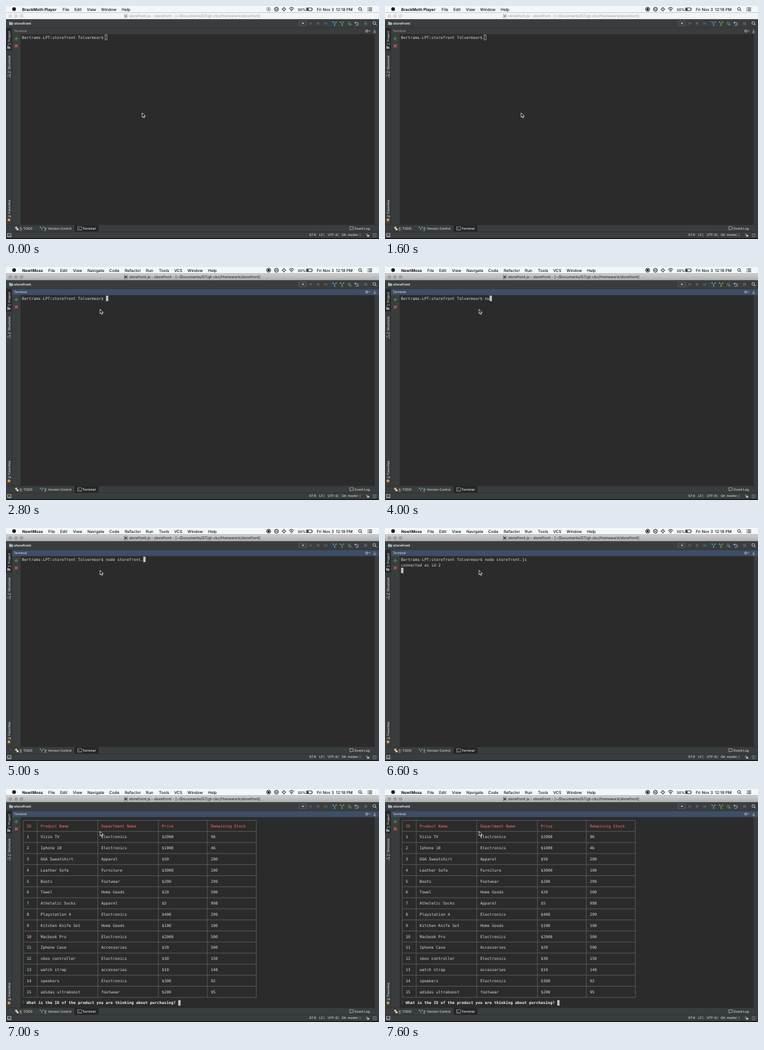
Write an HTML page that moves like this. It is 600 by 375 pixels and loops after 8000 ms.

```html
<!DOCTYPE html>
<html lang="en">
<head>
<meta charset="utf-8">
<title>Storefront terminal</title>
<style>
html, body { margin: 0; width: 100%; height: 100%; overflow: hidden; background: #3a3d3e; }
svg { display: block; width: 600px; height: 375px; }
text { font-family: Inter, sans-serif; text-rendering: geometricPrecision; white-space: pre; }
.menu { font-size: 6.4px; font-weight: 500; fill: #111; }
.ui { font-size: 5.1px; font-weight: 500; fill: #d6d8d9; }
.term { font: 6.23px "DejaVu Sans Mono", monospace; fill: #dadada; }
.bold { font-weight: 700; }
.head { fill: #ff6b68; }
.prompt { fill: #f0f0f0; }
.mark { fill: #6aa53f; }
.grid { fill: none; stroke: #626465; stroke-width: .8; }
</style>
</head>
<body>
<svg id="stage" viewBox="0 0 600 375" xmlns="http://www.w3.org/2000/svg"></svg>
<script>
const LOOP = 8000, LEFT = 25.8, TOP = 50.5, CW = 3.75, LH = 8.9;
const PROMPT = 'Bertrams-LPT:storefront Tolvermoor$ ';
const COMMAND = 'node storefront.js';
const CHROME = '#3a3d3e';

const col = c => LEFT + c * CW;
const row = r => TOP + r * LH;
const text = (x, y, s, cls, extra = '') => `<text x="${x}" y="${y}" class="${cls}" ${extra}>${s}</text>`;
const rect = (x, y, w, h, fill, extra = '') => `<rect x="${x}" y="${y}" width="${w}" height="${h}" fill="${fill}" ${extra}/>`;
const dot = (x, y, r, fill, extra = '') => `<circle cx="${x}" cy="${y}" r="${r}" fill="${fill}" ${extra}/>`;
const path = (d, stroke, w = .9, fill = 'none') => `<path d="${d}" stroke="${stroke}" stroke-width="${w}" fill="${fill}"/>`;
const group = (id, body) => `<g id="${id}">${body}</g>`;
const under = s => `<tspan text-decoration="underline">${s}</tspan>`;
const term = (c, r, s, cls = '') => text(col(c), row(r) + 2.2, s, 'term ' + cls);
const side = (y, s) => text(0, 0, s, 'ui', `transform="translate(6.5 ${y}) rotate(-90)"`);

// Menu bar
const menu = (app, items) => text(26, 7.6, app, 'menu bold') + items.map(([x, s]) => text(x, 7.6, s, 'menu')).join('');
const playerMenu = menu('BrackMoth Player', [[91, 'File'], [110, 'Edit'], [130, 'View'], [153, 'Window'], [186, 'Help']]);
const editorMenu = menu('NewtMoss', [[68, 'File'], [87, 'Edit'], [107.5, 'View'], [131, 'Navigate'], [166, 'Code'],
  [191, 'Refactor'], [225, 'Run'], [246, 'Tools'], [270.5, 'VCS'], [292, 'Window'], [325, 'Help']]);

const menuBar = rect(0, 0, 600, 10.6, '#f2f7fa') + dot(13, 5, 3, '#1c1c1c')
  + group('player', playerMenu) + group('editor', editorMenu)
  + group('record', dot(422.5, 5.2, 3.2, 'none', 'stroke="#111" stroke-width="1"') + rect(420.9, 3.6, 3.2, 3.2, '#111'))
  + dot(435, 5.2, 3.1, 'none', 'stroke="#111" stroke-width="1"') + path('M433.2 5.2h3.6', '#111', 1)
  + path('M447 1.6v7.2M443.4 5.2h7.2', '#111', .8) + dot(447, 5.2, 2.1, '#f2f7fa', 'stroke="#111" stroke-width=".9"')
  + path('M455.3 4.2q4-3.8 8 0M456.7 5.8q2.6-2.4 5.2 0M458.1 7.2q1.2-1 2.4 0', '#111', 1) + dot(459.3, 8, .6, '#111')
  + text(469, 7.6, '30%', 'menu', 'style="font-size:5.8px"')
  + path('M483.4 3h8.6v4.6h-8.6zM493 4.4v1.8', '#111', .8) + rect(484.2, 3.8, 2.4, 3, '#111')
  + text(500, 7.6, 'Fri Nov 3\u00a0 12:18 PM', 'menu')
  + dot(569.4, 4.7, 2.2, 'none', 'stroke="#111" stroke-width=".9"') + path('M571 6.3l2 2', '#111', 1)
  + path('M581.5 3h1M581.5 5.3h1M581.5 7.6h1M583.3 3h5.6M583.3 5.3h5.6M583.3 7.6h5.6', '#111', .9);

// Window title, in both focus states
const title = (bg, light, ink, sheet, mark) => rect(0, 10.6, 600, 10.8, bg)
  + [7, 16, 25].map(x => dot(x, 16, 2.6, light, 'stroke="#0003" stroke-width=".4"')).join('')
  + rect(190.5, 13.2, 4.6, 5.8, sheet, `stroke="${mark}" stroke-width=".5"`) + rect(191.2, 14.8, 3.2, 2.8, mark)
  + text(198, 18.3, 'storefront.js - storefront - [~/Documents/GT/gt-cbc/Homework/storefront]', '', `style="font-size:6px" fill="${ink}"`);

const toolBar = rect(0, 21.4, 600, 13.8, CHROME) + path('M0 35.2H600', '#2b2d2e', .6)
  + path('M5 25.6h2.4l.8 1h3.2v4H5z', 'none', 0, '#9db4c3')
  + text(13, 29.8, 'storefront', 'bold', 'style="font-size:5.6px" fill="#dcdedf"')
  + rect(471.3, 24, 12.4, 7.8, '#404345', 'rx="1.2" stroke="#66696b" stroke-width=".6"')
  + path('M475.8 27.1h3.8l-1.9 2.2z', 'none', 0, '#d0d2d3')
  + path('M488.4 25v6l5-3z', 'none', 0, '#55585a') + dot(502, 28, 2.4, '#55585a') + rect(511.5, 26, 5.5, 4, '#4e5153')
  + path('M526 26l2.6 2.2v2.8M531.2 26l-2.6 2.2', '#4fa7d8', 1) + dot(526, 25.8, 1, '#4fa7d8') + dot(531.2, 25.8, 1, '#62b543') + dot(528.6, 31, 1, '#4fa7d8')
  + path('M538 26l2.6 2.2v2.8M543.2 26l-2.6 2.2', '#62b543', 1) + dot(538, 25.8, 1, '#4fa7d8') + dot(543.2, 25.8, 1, '#62b543') + dot(540.6, 31, 1, '#62b543')
  + rect(549.5, 25.2, 5, 5, '#55585a') + dot(554, 30, 1.7, '#6c7072')
  + path('M562.6 31h2.2a2.1 2.1 0 0 0 0-4.2h-3.6M562.8 25l-2 1.8 2 1.8', '#9cc3e6', 1)
  + path('M521.5 24v8M571.5 24v8', '#4c4f51', .5)
  + rect(575.8, 25.4, 5.2, 5.2, '#55585a') + dot(592.4, 27.3, 2.2, 'none', 'stroke="#d0d2d3" stroke-width=".9"')
  + path('M594 29l2.2 2.2', '#d0d2d3', 1);

const sideBars = rect(0, 35.5, 9.3, 36, '#262829') + path('M9.5 35.2V352', '#2b2d2e', .6)
  + side(62.5, under('1') + ': Project') + rect(2.4, 64.4, 2, 4.4, '#b4bfc6') + rect(5, 65.6, 1.8, 3.2, '#b4bfc6')
  + side(108, under('7') + ': Structure') + dot(3.2, 112, 1.1, '#5aa0c8') + dot(6.4, 110.7, 1, '#d0d2d3') + dot(6.4, 114, 1, '#d08460')
  + side(340, under('2') + ': Favorites')
  + path('M4.8 341l.9 2 2.2.2-1.7 1.5.6 2.2-2-1.2-2 1.2.6-2.2-1.7-1.5 2.2-.2z', 'none', 0, '#f0a83d')
  + path('M13.5 52.5h6M16.5 49.5v6', '#3f8f47', 1.4) + path('M14.2 61.9l4.6 4.6M18.8 61.9l-4.6 4.6', '#dc5a4e', 1.4);

const panelTitle = fill => rect(9.8, 35.5, 590.2, 9.8, fill);
const panel = group('calm', panelTitle(CHROME) + text(12.5, 42.2, 'Terminal', 'ui', 'opacity=".6"'))
  + group('active', panelTitle('#3e4e66') + text(12.5, 42.2, 'Terminal', 'ui'))
  + dot(580.4, 40.3, 1.7, 'none', 'stroke="#c3c5c6" stroke-width="1.3" stroke-dasharray="1 .4"')
  + path('M583.8 39.6h2.4l-1.2 1.4z', 'none', 0, '#c3c5c6')
  + path('M593 37.6v4M591.4 40.3l1.6 1.6 1.6-1.6M590.8 42.9h4.4', '#c3c5c6', .7)
  + rect(23.5, 45.3, 569.5, 306.7, '#2b2b2b');

// Tool window buttons and status bar
const arrows = x => path(`M${x} 367.7l.9-1.2.9 1.2M${x} 369.3l.9 1.2.9-1.2`, '#c3c5c6', .6);
const footer = path('M0 352.2H600M0 363.5H600', '#2b2d2e', .6)
  + rect(110, 352.4, 39, 11, '#252728')
  + dot(16.5, 356.8, 1.9, '#e0bd74') + dot(18.6, 359.4, 1.7, '#dcdedf')
  + text(22, 360, under('6') + ': TODO', 'ui')
  + path('M55.2 356l2.4 2.2v2.6M59.8 356l-2.2 2.2', '#5aaedc', 1) + dot(55.2, 356, .9, '#5aaedc') + dot(59.8, 356, .9, '#62b543')
  + text(61.5, 360, under('9') + ': Version Control', 'ui')
  + rect(115.5, 355.2, 5.8, 5.6, '#151617', 'stroke="#c9cbcc" stroke-width=".6"') + path('M116.7 357l1.2 1-1.2 1M118.4 359.4h1.7', '#eee', .6)
  + text(123, 360, 'Terminal', 'ui', 'style="fill:#f2f3f4"')
  + path('M553 355.2h5.6v4.3h-3.4l-1.3 1.4v-1.4h-.9z', '#c3c5c6', .7) + text(561, 360, 'Event Log', 'ui')
  + rect(2.6, 366.2, 5.4, 5.2, 'none', 'stroke="#c3c5c6" stroke-width=".8"') + path('M3 370h4.6', '#c3c5c6', .7)
  + text(488, 370.4, '67:8', 'ui') + text(504, 370.4, 'LF', 'ui') + arrows(510.6)
  + text(517.5, 370.4, 'UTF-8', 'ui') + arrows(533.6) + text(540, 370.4, 'Git: master', 'ui') + arrows(568.6)
  + rect(580.8, 368.4, 3.4, 2.8, '#c3c5c6') + path('M579.4 368.6v-1a1 1 0 0 1 2 0v1', '#c3c5c6', .6)
  + rect(590.8, 366.4, 4.4, 5, 'none', 'stroke="#85888a" stroke-width=".7"') + path('M591.8 368.2h2.4M591.8 369.8h2.4', '#85888a', .6)
  + rect(0, 373.8, 600, 1.2, '#0c0c0c');

// Product table
const HEAD = ['ID', 'Product Name', 'Department Name', 'Price', 'Remaining Stock'];
const ITEMS = `Vizio TV|Electronics|2000|96
Iphone 10|Electronics|1000|46
UGA Sweatshirt|Apparel|50|200
Leather Sofa|Furniture|3000|100
Boots|Footwear|200|299
Towel|Home Goods|20|500
Atheletic Socks|Apparel|5|998
Playstation 4|Electronics|400|299
Kitchen Knife Set|Home Goods|100|100
Macbook Pro|Electronics|2000|500
Iphone Case|Accessories|20|500
xbox controller|Electronics|30|150
watch strap|accessories|10|148
speakers|Electronics|300|92
adidas ultraboost|footwear|200|95`.split('\n').map((line, i) => {
  const [name, dept, price, stock] = line.split('|');
  return [i + 1, name, dept, '$' + price, stock];
});
const EDGES = [.5, 6.5, 32.5, 58.5, 79.5, 100.5];

// A cut table stops part way through its last border
function table(top, count, cut) {
  const last = top + 2 * (count + 1);
  let d = '';
  for (let r = top; r <= last; r += 2)
    d += `M${col(.5)} ${row(r)}H${cut && r === last ? 232 : col(100.5)}`;
  EDGES.forEach((e, i) => {
    const end = cut ? row(last) + (i < 3 ? 4 : -4.4) : row(last);
    d += `M${col(e)} ${row(top)}V${end}`;
  });
  const cells = [HEAD, ...ITEMS.slice(0, count)].map((cols, i) =>
    cols.map((s, c) => term(EDGES[c] + 1.5, top + 1 + 2 * i, s, i ? '' : 'head')).join('')).join('');
  return `<path class="grid" d="${d}"/>` + cells;
}

const terminal = group('shell', term(0, 0, PROMPT + '<tspan id="typed"></tspan>'))
  + group('connected', term(0, 1, 'connected as id 2'))
  + group('partial', table(2, 9, true))
  + group('full', table(0, 15, false) + term(0, 33, '?', 'mark')
    + term(2, 33, 'What is the ID of the product you are thinking about purchasing?', 'bold prompt'))
  + rect(159.4, 46.4, 3, 8.1, 'none', 'id="hollow" stroke="#c4c4c4" stroke-width=".7"')
  + rect(0, -4.4, 3.75, 8.8, '#c4c4c4', 'id="caret"');

const pointer = group('mouse', path('M0 0v7l1.6-1.5 1.1 2.6 1.3-.5-1.1-2.5h2.3z', '#fff', .8, '#000'));

document.getElementById('stage').innerHTML = rect(0, 0, 600, 375, CHROME)
  + '<linearGradient id="bar" x2="0" y2="1"><stop stop-color="#cfcfcf"/><stop offset="1" stop-color="#adadad"/></linearGradient>'
  + menuBar
  + group('idleTitle', title('#f4f4f4', '#dedede', '#9a9a9a', '#fff', '#8c8c8c'))
  + group('liveTitle', title('url(#bar)', '#a0a0a0', '#161616', '#eee', '#222'))
  + toolBar + sideBars + panel + footer + terminal + pointer;

// Each step changes only the listed values
const STEPS = [
  [0, { record: .4, mouse: [219, 172], focus: false, typed: 0, caret: null, screen: 'shell' }],
  [200, { record: 1 }],
  [1800, { mouse: [44, 73.5] }],
  [2600, { mouse: [151.3, 68.2] }],
  [2800, { focus: true, caret: [36, 0] }],
  [3800, { caret: null }],
  [4000, { typed: 2, caret: [38, 0] }],
  [4200, { typed: 4, caret: [40, 0] }],
  [4400, { typed: 6, caret: [42, 0] }],
  [5000, { typed: 16, caret: [52, 0] }],
  [5400, { typed: 17, caret: [53, 0] }],
  [5600, { typed: 18, caret: [54, 0] }],
  [6000, { caret: null }],
  [6400, { caret: [0, 1] }],
  [6600, { screen: 'connected', caret: [0, 2] }],
  [6800, { screen: 'partial', caret: [101, 22] }],
  [7000, { screen: 'full', caret: [67, 33] }]
];

const $ = id => document.getElementById(id);
const show = (id, on) => { $(id).style.display = on ? '' : 'none'; };
const move = (id, x, y) => $(id).setAttribute('transform', `translate(${x} ${y})`);
let drawn = -1;

function draw(t) {
  const n = STEPS.filter(s => s[0] <= t).length;
  if (n === drawn) return;
  drawn = n;
  const s = Object.assign({}, ...STEPS.slice(0, n).map(step => step[1]));
  for (const id of ['editor', 'liveTitle', 'active']) show(id, s.focus);
  for (const id of ['player', 'idleTitle', 'calm', 'hollow']) show(id, !s.focus);
  $('record').setAttribute('opacity', s.record);
  $('typed').textContent = COMMAND.slice(0, s.typed);
  show('shell', s.screen !== 'full');
  show('connected', s.screen === 'connected' || s.screen === 'partial');
  show('partial', s.screen === 'partial');
  show('full', s.screen === 'full');
  show('caret', s.caret);
  if (s.caret) move('caret', col(s.caret[0]), row(s.caret[1]));
  $('caret').setAttribute('opacity', s.screen === 'partial' ? .55 : 1);
  move('mouse', ...s.mouse);
}

const start = performance.now();
function tick() {
  draw((performance.now() - start) % LOOP);
  requestAnimationFrame(tick);
}
tick();
</script>
</body>
</html>
```
